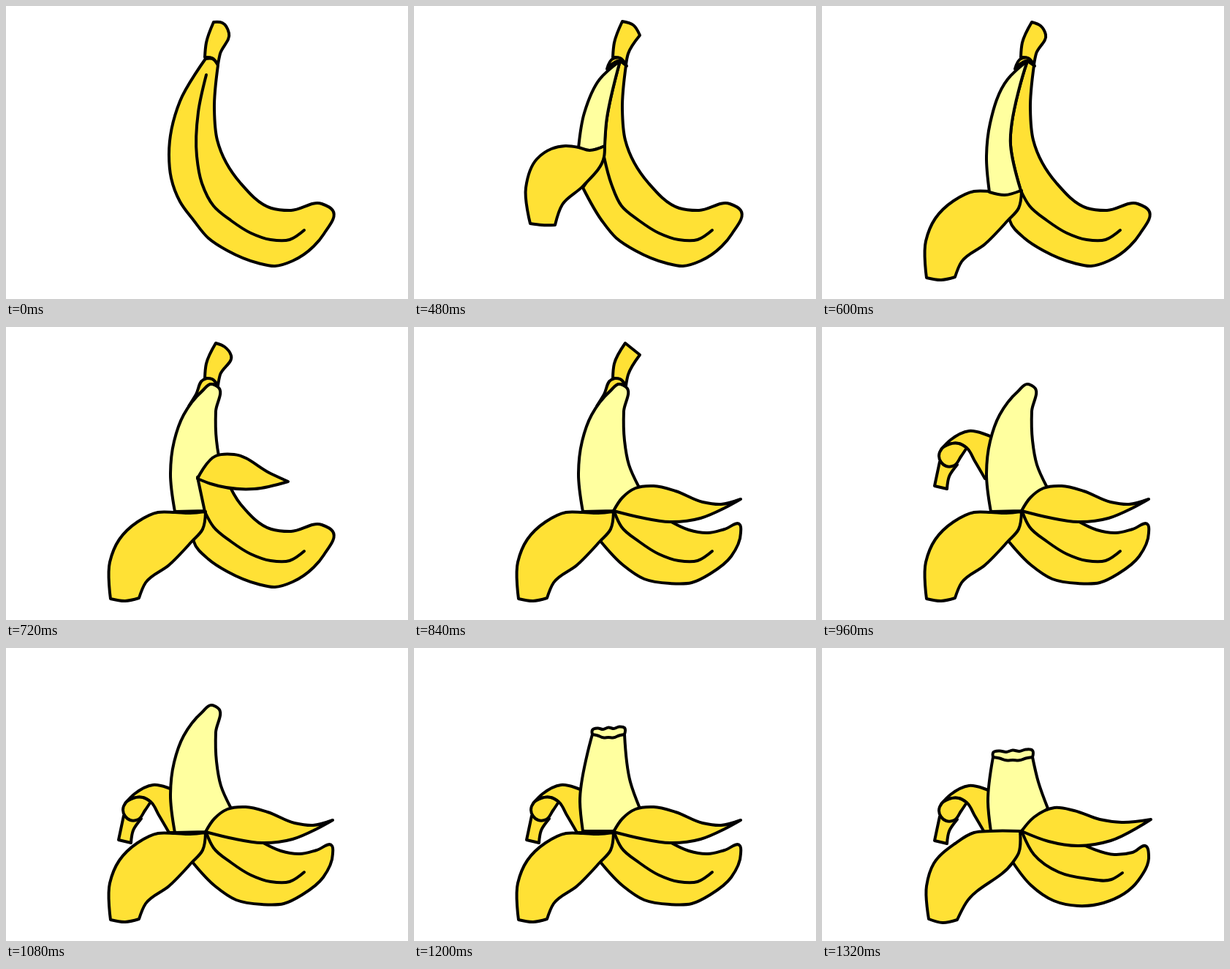
An HTML page with a canvas for the animation above (1760 ms loop, 550 px wide and 400 px high).

```html
<!DOCTYPE html>
<html lang="en">
<head>
<meta charset="utf-8">
<title>Peeling banana</title>
<style>
html, body { margin: 0; width: 100%; height: 100%; overflow: hidden; background: #fff; }
canvas { display: block; }
</style>
</head>
<body>
<canvas id="stage" width="550" height="400"></canvas>
<script>
const ctx = document.getElementById('stage').getContext('2d');
const LOOP = 1760, FIRST = 480, STEP = 120;

// A smooth curve through a few points; "!" marks a sharp corner.
// The tangent at a point is that of the circle through it and its neighbours.
function part(fill, text, dy = 0) {
  const pts = text.trim().split(/\s+/).map(token => {
    const [x, y] = token.replace('!', '').split(',').map(Number);
    return { x, y: y + dy, sharp: token.endsWith('!') };
  });
  const n = pts.length;
  const at = i => pts[(i + n) % n];
  const gap = (a, b) => Math.hypot(b.x - a.x, b.y - a.y);
  if (!fill) pts[0].sharp = pts[n - 1].sharp = true;
  pts.forEach((p, i) => {
    const a = at(i - 1), b = at(i + 1);
    const u = gap(a, p) ** 2, v = gap(p, b) ** 2;
    const tx = (p.x - a.x) / u + (b.x - p.x) / v;
    const ty = (p.y - a.y) / u + (b.y - p.y) / v;
    const size = Math.hypot(tx, ty);
    p.tx = p.sharp ? 0 : tx / size;
    p.ty = p.sharp ? 0 : ty / size;
  });
  const path = new Path2D();
  path.moveTo(pts[0].x, pts[0].y);
  for (let i = 0; i < (fill ? n : n - 1); i++) {
    const a = at(i), b = at(i + 1), d = gap(a, b) / 3;
    path.bezierCurveTo(a.x + a.tx * d, a.y + a.ty * d, b.x - b.tx * d, b.y - b.ty * d, b.x, b.y);
  }
  if (fill) path.closePath();
  return { fill, path };
}
const skin = (text, dy) => part('#ffe135', text, dy);
const flesh = text => part('#ffff9f', text);
const line = text => part(null, text);

// Outlines shared by several poses
const SIDE = '290,81! 285,140 289,183 ';
const TAIL = `321,242 363,276 390,279 432,270 447,279 435,311 421,328 392,348
  368,355 345,351 303,334 277,317 257,293 `;
const RIDGE = ' 284,273 308,293 335,310 362,319 388,319 408,306';

const stem = end => skin(`272,70! 274,50 ${end} 293,65 290,80! 282,71`);
const ridge = start => line(start + RIDGE);
const collar = skin('264,86! 272,72 283,71 291,82! 281,75');
const neck = skin('250,108! 260,92 270,72 280,70 290,80! 280,78 270,86');
const core = flesh(`290,82 281,78 268,88 243,120 230,156 225,200 231,252! 273,251!
  308,219! 294,188 288,155 287,115`);
const leftFlap = skin(`231,253 208,253 180,266 155,290 142,321 143,371! 163,374 182,370!
  191,349 223,325 254,293 269,276 273,252! 252,254`);
const lowerPeel = [
  skin(`273,251! 352,266! 376,277 402,281 425,276 446,270 447,281 434,313 405,337 380,349
    350,350 315,344 286,325 254,291!`),
  ridge('274,252'),
  skin('273,251! 285,233 303,220 328,217 358,224 395,239 420,242 447,235! 425,247 392,261 350,266 310,260'),
  leftFlap
];

const backPeel = dy => [
  skin('161,229! 154,262! 171,266! 174,249 185,233!', dy),
  skin('232,195! 201,187 176,199 163,212! 174,205 187,204 198,210 209,228 223,252! 240,252!', dy),
  skin('164,211 160,221 170,235 181,234 190,222 198,210! 187,204 174,205', dy)
];

// Flesh bitten off at height y, between its left and right edges
function bitten(left, right, y) {
  const rim = height => [0, 1, 2, 3, 4, 5, 6]
    .map(i => `${left + (right - left) * i / 6},${y + height(i)}`).join(' ');
  return [
    flesh(`${left},${y}! ${rim(i => -6 - i % 2 * 2 - i / 2)} ${right},${y}!
      296,183 309,219! 273,250! 231,250! 227,210`),
    line(rim(i => 5 * Math.sin(Math.PI * i / 6) - i % 2))
  ];
}

const poses = [
  [
    skin(SIDE + TAIL + '238,267 226,235 223,203 238,130 273,72! 282,72'),
    stem('284,22! 296,23 305,37'),
    line('274,94 263,145 261,205 268,242' + RIDGE)
  ],
  [
    skin(SIDE + TAIL + '231,248! 260,206! 263,160 282,75!'),
    collar,
    flesh('282,75! 254,100 233,146 225,194! 240,197 261,191! 263,160'),
    ridge('260,206 270,243'),
    skin(`225,193 207,191 188,195 168,209 153,248 159,297! 175,299 193,299! 203,271 231,246
      260,206 261,191! 240,197`),
    stem('285,21! 300,26 309,40!')
  ],
  [
    skin(SIDE + TAIL + '272,252! 258,190 281,75!'),
    collar,
    leftFlap,
    flesh('281,75! 254,100 230,160 225,205 229,254! 250,258 272,252! 258,190'),
    ridge('272,252'),
    stem('287,22! 299,27 306,39')
  ],
  [
    neck,
    core,
    skin('292,185! ' + TAIL + '272,252! 262,205!'),
    ridge('272,252'),
    skin('262,207! 287,176 312,174 362,200 386,211! 340,221 280,214'),
    leftFlap,
    stem('287,22! 299,27 308,39')
  ],
  [neck, core, ...lowerPeel, stem('289,22! 309,38!')],
  [...backPeel(-45), core, ...lowerPeel],
  [...backPeel(0), core, ...lowerPeel],
  [...backPeel(0), ...bitten(244, 288, 118), ...lowerPeel],
  [
    ...backPeel(1),
    ...bitten(234, 288, 149),
    skin(`273,250! 358,269! 400,282 425,279 444,271 447,283 433,317 385,348 350,352 317,345
      286,324 260,291!`),
    line('274,252 290,282 324,306 363,315 396,316 411,307'),
    skin('273,250! 290,231 318,218 345,222 380,234 410,238 450,234! 395,263 350,270 310,264'),
    skin(`271,250! 230,250 208,252 182,267 153,294 143,325 146,370! 165,375 185,371!
      197,348 260,294 269,280`)
  ]
];

ctx.lineWidth = 4;
ctx.lineCap = ctx.lineJoin = 'round';

function draw() {
  const t = performance.now() % LOOP;
  const step = Math.floor((t - FIRST) / STEP) + 1;
  const pose = Math.max(0, Math.min(poses.length - 1, step));
  ctx.clearRect(0, 0, 550, 400);
  for (const { fill, path } of poses[pose]) {
    if (fill) {
      ctx.fillStyle = fill;
      ctx.fill(path);
    }
    ctx.stroke(path);
  }
  requestAnimationFrame(draw);
}
draw();
</script>
</body>
</html>
```
